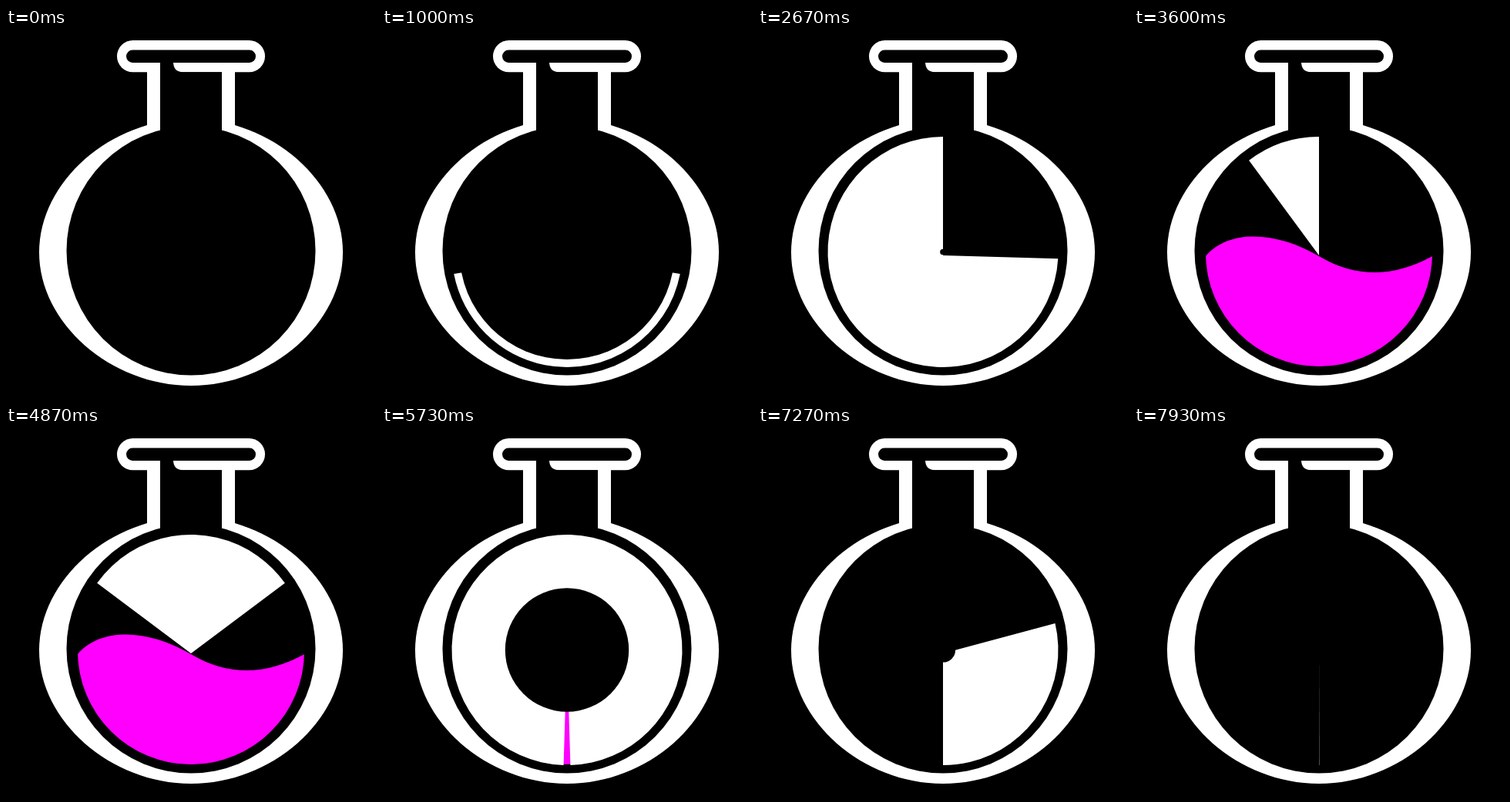
Write an HTML page with a canvas that moves like this. It is 480x480 px and loops after 7990 ms.

```html
<!DOCTYPE html>
<html lang="en">
<head>
<meta charset="utf-8">
<title>Flask</title>
<style>
  html, body { margin: 0; height: 100%; overflow: hidden; background: #000; }
  canvas { display: block; }
</style>
</head>
<body>
<canvas id="stage" width="480" height="480"></canvas>
<script>
const ctx = document.getElementById('stage').getContext('2d');
const LOOP = 7990, CX = 240, CY = 290.5, R = 149.5, THIN = 139.5;
const WHITE = '#fff', BLACK = '#000', LIQUID = '#f0f';

// progress of f between two steps, 0 to 1
const part = (f, from, to) => Math.min(1, Math.max(0, (f - from) / (to - from)));
const smooth = t => t * t * (3 - 2 * t);
const inOut = (t, n) => t < .5 ? (2 * t) ** n / 2 : 1 - (2 - 2 * t) ** n / 2;

function fill(color, trace) {
  ctx.fillStyle = color;
  ctx.beginPath();
  trace();
  ctx.fill();
}
const disc = (color, y, r) =>
  fill(color, () => ctx.arc(CX, y, r, 0, 2 * Math.PI));
const box = (color, x, y, w, h, r = 0) =>
  fill(color, () => ctx.roundRect(x, y, w, h, r));

// oval slightly flatter on the diagonals than an ellipse
function oval(color, y, rx, ry, k) {
  fill(color, () => {
    ctx.moveTo(CX + rx, y);
    for (const [sx, sy] of [[1, 1], [-1, 1], [-1, -1], [1, -1]]) {
      const side = [CX + sx * rx, y + sy * ry * k];
      const pole = [CX + sx * rx * k, y + sy * ry];
      if (sx === sy) ctx.bezierCurveTo(...side, ...pole, CX, y + sy * ry);
      else ctx.bezierCurveTo(...pole, ...side, CX + sx * rx, y);
    }
  });
}

function drawFlask() {
  oval(WHITE, 291, 197, 173, .53);
  disc(BLACK, 289, 161.5);
  box(WHITE, 183, 50, 17, 82);
  box(WHITE, 280, 50, 17, 82);
  box(WHITE, 144, 16, 192, 41.3, 20.6);
  box(BLACK, 156, 28.5, 168, 16.5, 8.25);
  // neck opening with its rounded notch under the rim
  fill(BLACK, () => {
    ctx.moveTo(200, 44);
    ctx.lineTo(217, 44);
    ctx.bezierCurveTo(217, 52, 221, 57.3, 230, 57.3);
    ctx.lineTo(280, 57.3);
    ctx.lineTo(280, 145);
    ctx.lineTo(200, 145);
  });
}

function drawLiquid(drop) {
  ctx.save();
  ctx.beginPath();
  ctx.arc(CX, 292, 147, 0, 2 * Math.PI);
  ctx.clip();
  ctx.translate(0, drop);
  fill(LIQUID, () => {
    ctx.moveTo(93, 296);
    ctx.bezierCurveTo(125, 258, 190, 266, 240, 296);
    ctx.bezierCurveTo(290, 326, 340, 322, 387, 296);
    ctx.lineTo(387, 450);
    ctx.lineTo(93, 450);
  });
  ctx.restore();
}

// white sector; ends in turns, clockwise from the top
function drawSector(from, to) {
  if (to - from < 1e-5) return;
  const angle = turn => (turn - .25) * 2 * Math.PI;
  fill(WHITE, () => {
    if (to - from < .99999) ctx.moveTo(CX, 295);
    ctx.arc(CX, CY, R, angle(from), angle(to));
  });
}

function sectorAt(f) {
  let p;
  if (f < 30) {
    p = inOut(part(f, .95, 30.3), 3) / 2;
    return [.5 - p, .5 + p];
  }
  if (f < 60) return [smooth(part(f, 30, 60)), 1];
  if (f < 90) {
    p = inOut(part(f, 60.6, 89.9), 3) / 2;
    return [-p, p];
  }
  return [.5 + smooth(part(f, 90.2, 119.3)), 1.5];
}

function holeAt(f) {
  if (f < 60) return THIN * (1 - inOut(part(f, 20, 44.7), 3));
  if (f < 91) return THIN * inOut(part(f, 80, 91.4), 3);
  return THIN * (1 - inOut(part(f, 90.5, 120), 5));
}

function draw(now) {
  // the picture advances at 15 steps per second
  const f = Math.floor((now % LOOP + 5) * .015);
  ctx.fillStyle = BLACK;
  ctx.fillRect(0, 0, 480, 480);
  drawFlask();
  if (f >= 30 && f < 90) drawLiquid(154 * (1 - inOut(part(f, 43.5, 54), 3)));
  drawSector(...sectorAt(f));
  const hole = holeAt(f);
  if (hole > 0) disc(BLACK, CY, hole);
}

let start;
function tick(now) {
  start ??= now;
  draw(now - start);
  requestAnimationFrame(tick);
}
draw(0);
requestAnimationFrame(tick);
</script>
</body>
</html>
```
